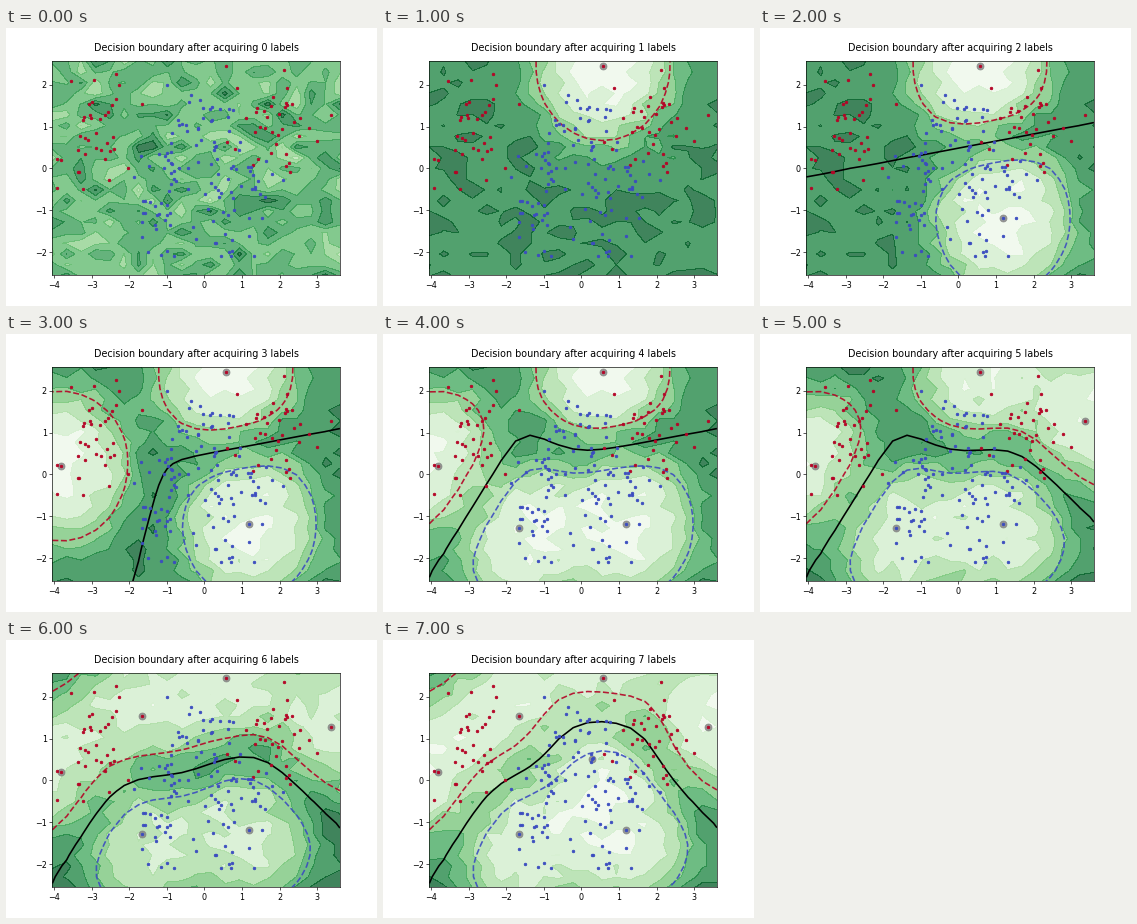
These frames come from a looping animation (371x278 px, 8000 ms). A matplotlib script:

```python
import numpy as np
import matplotlib.pyplot as plt
from matplotlib.animation import FuncAnimation

W, H, DPI = 371, 278, 58
XLIM, YLIM = (-4.045, 3.602), (-2.558, 2.558)
RES = 21          # grid on which all fields are evaluated
PRIOR = 0.1       # pseudo-count per class
SIGMA = 0.055     # noise of the utility
STEP = 0.155      # utility per colour band
LOWEST = (0.09, 0.09, 0.07, 0.07, 0.0, -0.07, 0.03)
RED, BLUE = plt.get_cmap("coolwarm")(1.0), plt.get_cmap("coolwarm")(0.0)

rng = np.random.default_rng(12)


def cluster(center, spread, count):
    return center + spread * np.clip(rng.normal(size=(count, 2)), -2, 2)


# Labelled samples in order of acquisition
queries = np.array([(0.573, 2.455), (1.185, -1.19), (-3.816, 0.2),
                    (-1.661, -1.286), (3.366, 1.28), (-1.661, 1.544),
                    (0.28, 0.513)])
is_red = np.array([1, 0, 1, 0, 1, 1, 0], bool)

reds = np.vstack([queries[is_red],
                  cluster((-3.0, 0.85), (0.6, 0.7), 36),
                  cluster((1.8, 1.05), (0.6, 0.65), 36)])
blues = np.vstack([queries[~is_red],
                   cluster((0.0, 1.0), (0.6, 0.5), 30),
                   cluster((-1.2, -0.9), (0.5, 0.6), 36),
                   cluster((0.6, -0.6), (0.75, 0.75), 54)])

gx, gy = np.meshgrid(np.linspace(*XLIM, RES), np.linspace(*YLIM, RES))
noise = np.clip(rng.normal(size=gx.shape), -3.2, 2.6)


def kernel_sum(points):
    total = np.zeros_like(gx)
    for x, y in points:
        total += np.exp(-((gx - x) ** 2 + (gy - y) ** 2) / 2)
    return total


def bands(n):
    """Edges of the utility's colour bands after n labels."""
    if n == 0:
        return 1 + 0.95 * SIGMA * np.arange(-5, 4)
    return LOWEST[n - 1] + STEP * np.arange(8)


def line(field, level, color, style, alpha=1):
    if field.min() < level < field.max():
        ax.contour(gx, gy, field, [level], colors=[color], linewidths=2,
                   linestyles=style, alpha=alpha, zorder=1.2)


def draw(n):
    ax.clear()
    known, red = queries[:n], is_red[:n]
    r, b = kernel_sum(known[red]), kernel_sum(known[~red])
    total = r + b + 2 * PRIOR
    p = (r + PRIOR) / total

    # Posterior variance relative to its value without labels
    variance = p * (1 - p) / (total + 1) * 4 * (1 + 2 * PRIOR)
    edges = bands(n)
    utility = np.clip(variance + SIGMA * noise, edges[0] + 1e-6, edges[-1] - 1e-6)
    ax.contourf(gx, gy, utility, edges, cmap="Greens", alpha=0.75, zorder=0.5)

    line(p, 0.5, "k", "-")
    line(p, 0.75, RED, "--", 0.9)
    line(p, 0.25, BLUE, "--", 0.9)
    ax.scatter(*known.T, color="grey", alpha=0.8, marker=".", s=300, zorder=1.5)
    for points, color in ((reds, RED), (blues, BLUE)):
        ax.scatter(*points.T, color=color, s=10, zorder=2)

    ax.text(0.5, 1.05, f"Decision boundary after acquiring {n} labels",
            size=12, ha="center", transform=ax.transAxes)
    ax.set(xlim=XLIM, ylim=YLIM, xticks=range(-4, 4), yticks=range(-2, 3))
    return []


fig, ax = plt.subplots(figsize=(W / DPI, H / DPI), dpi=DPI)
fig.subplots_adjust(left=0.125, right=0.9, bottom=0.11, top=0.88)
anim = FuncAnimation(fig, draw, frames=8, init_func=lambda: draw(0),
                     interval=1000, repeat=True, repeat_delay=0)
plt.show()
```
